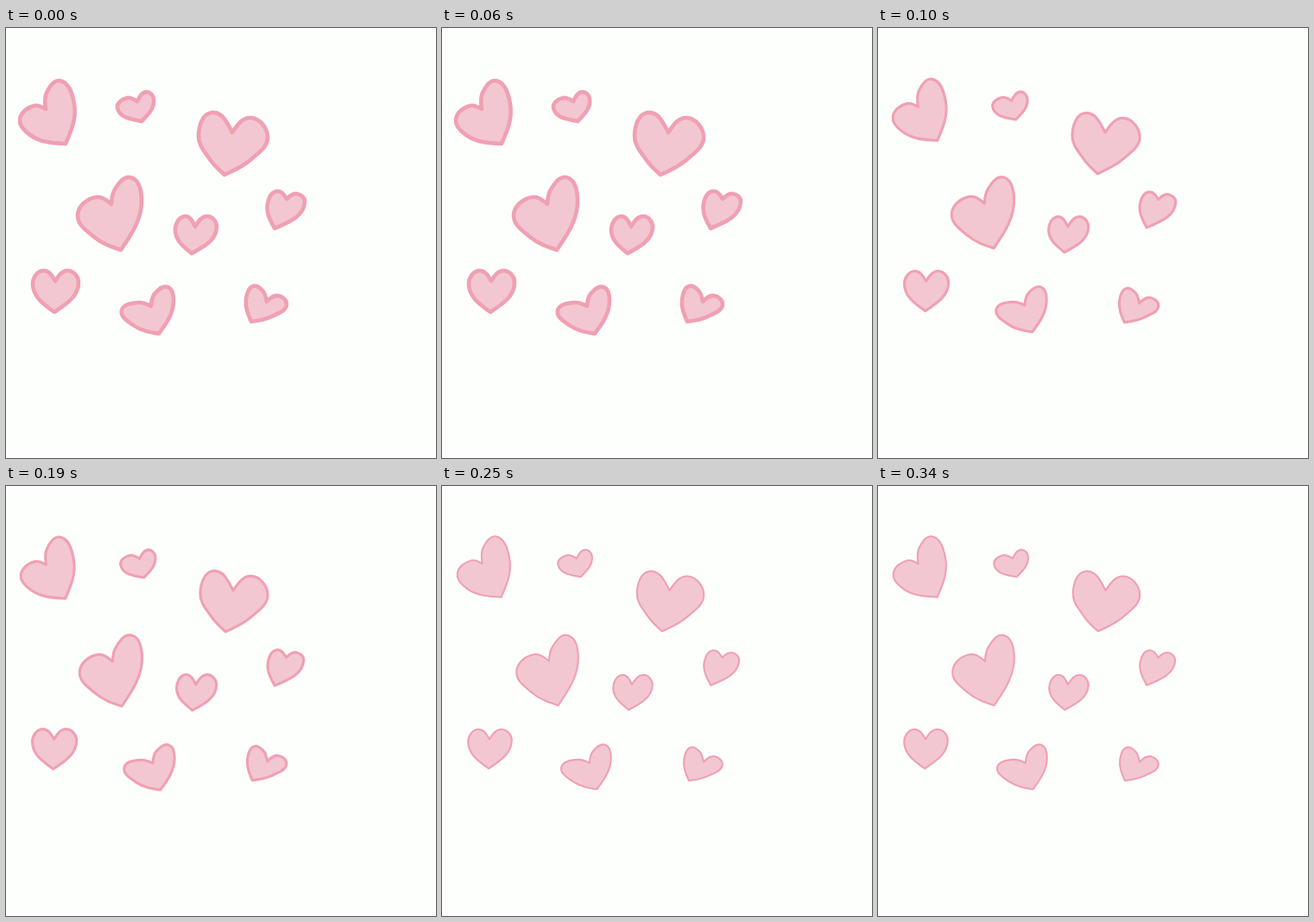
An HTML page for the animation above (0.4 s loop, 498 by 498 pixels).

```html
<!DOCTYPE html>
<html lang="en">
<head>
<meta charset="utf-8">
<title>Wobbling hearts</title>
<style>
  html, body { margin: 0; width: 100%; height: 100%; overflow: hidden; background: #fdfffd; }
  svg { display: block; width: 100%; height: 100%; }
  path { fill: #f2c7d1; stroke: #f0a0b2; stroke-linejoin: round; }
</style>
</head>
<body>
<svg id="stage" viewBox="0 0 498 498"></svg>
<script>
const LOOP = 400;
const POSES = [
  { until: 100, stroke: 4.6, shrink: 0, drift: 0 },
  { until: 250, stroke: 3.1, shrink: 1.8, drift: 0.7 },
  { until: LOOP, stroke: 2.1, shrink: 2.5, drift: 1 }
];

// Each outline runs notch, left lobe, tip, right lobe; both lobes have equally many points.
const HEARTS = [
  { drift: [0.5, -4], outline: "46,94 33,90 16,106 28,124 69,134 79,88 62,61 47,75" },
  { drift: [4, -1.5], outline: "152,85 140,81 129,92 157,108 171,82 163,74" },
  { drift: [1.5, -0.5], outline: "262,121 238,98 223,124 236,152 253,170 284,152 303,126 284,104" },
  { drift: [2, -1.5], outline: "122,204 104,196 83,216 102,242 133,257 157,197 144,173 126,187" },
  { drift: [1, -0.5], outline: "219,230 207,218 196,234 215,261 244,231 234,218" },
  { drift: [-0.5, 0], outline: "325,198 314,189 303,203 311,232 346,201 337,192" },
  { drift: [-2, -0.5], outline: "57,293 43,281 31,296 56,329 84,294 72,281" },
  { drift: [3, -1.5], outline: "168,322 154,318 134,327 147,344 177,354 194,316 187,300 172,308" },
  { drift: [1, 2.5], outline: "302,317 297,304 286,299 278,314 284,340 308,334 325,320 315,310" }
];

const add = (a, b, k = 1) => [a[0] + b[0] * k, a[1] + b[1] * k];
const dist = (a, b) => Math.hypot(b[0] - a[0], b[1] - a[1]);
const unit = (a, b) => add(b, a, -1).map(v => v / (dist(a, b) || 1));
const middle = (a, b) => [(a[0] + b[0]) / 2, (a[1] + b[1]) / 2];
const text = p => p.map(v => v.toFixed(2)).join(" ");

// Smooth closed curve with sharp corners at the notch and the tip.
function heartPath(points) {
  const n = points.length;
  const at = i => points[(i + n) % n];
  const isCorner = i => i % (n / 2) === 0;
  const tangent = i => unit([0, 0], add(unit(at(i - 1), at(i)), unit(at(i), at(i + 1))));
  let d = "M" + text(points[0]);
  for (let i = 0; i < n; i++) {
    const from = at(i), to = at(i + 1);
    const reach = dist(from, to) * 0.36;
    let out = add(from, tangent(i), reach);
    let into = add(to, tangent(i + 1), -reach);
    if (isCorner(i)) out = middle(from, into);
    if (isCorner(i + 1)) into = middle(to, out);
    d += "C" + [out, into, to].map(text).join(" ");
  }
  return d + "Z";
}

function makeHeart({ drift, outline }) {
  const points = outline.split(" ").map(pair => pair.split(",").map(Number));
  const span = axis => {
    const values = points.map(p => p[axis]);
    return [Math.min(...values), Math.max(...values)];
  };
  const spans = [span(0), span(1)];
  const path = document.createElementNS("http://www.w3.org/2000/svg", "path");
  stage.append(path);

  return pose => {
    const moved = points.map(p => p.map((v, axis) => {
      const [low, high] = spans[axis];
      const center = (low + high) / 2;
      const scale = 1 - pose.shrink / (high - low);
      return center + (v - center) * scale + drift[axis] * pose.drift;
    }));
    path.setAttribute("d", heartPath(moved));
    path.setAttribute("stroke-width", pose.stroke);
  };
}

const stage = document.getElementById("stage");
const hearts = HEARTS.map(makeHeart);
const start = performance.now();

function draw(ms) {
  const pose = POSES.find(p => ms % LOOP < p.until);
  hearts.forEach(update => update(pose));
}

function tick() {
  draw(performance.now() - start);
  requestAnimationFrame(tick);
}
tick();
</script>
</body>
</html>
```
